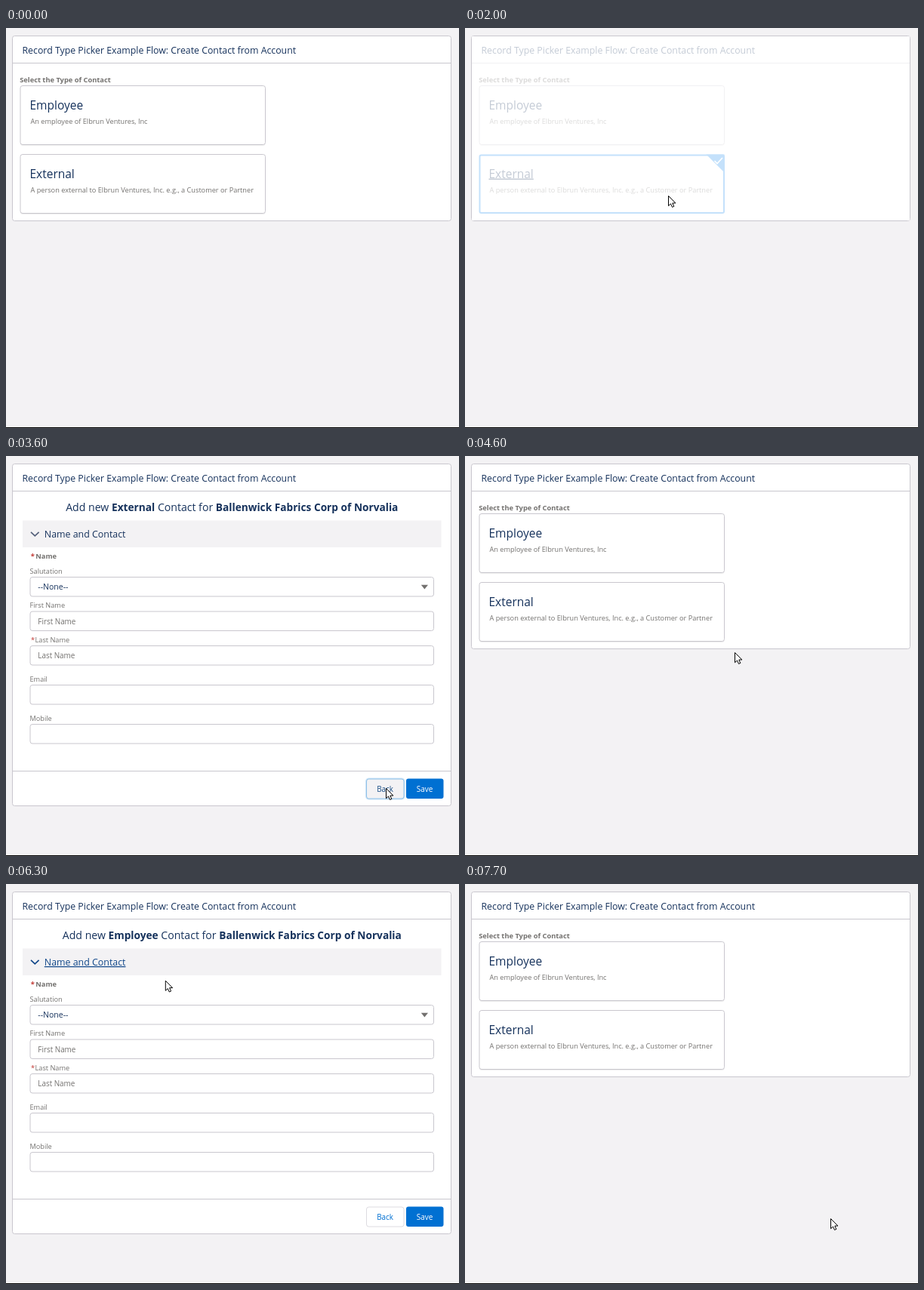
These frames come from a looping animation (600x530 px, 8000 ms). An HTML page:

```html
<!DOCTYPE html>
<html lang="en">
<head>
<meta charset="utf-8">
<title>Record Type Picker</title>
<style>
html, body { margin: 0; width: 100%; height: 100%; overflow: hidden; background: #f3f2f4; }
svg { display: block; font-family: "Open Sans", "Noto Sans", sans-serif; }
</style>
</head>
<body>
<svg id="stage" width="600" height="530" viewBox="0 0 600 530"></svg>
<script>
const LOOP = 8000, STEP = 100;
const NAVY = '#16325c', GRAY = '#73716f', LINE = '#c9c7ce', BLUE = '#1589ee';

const text = (x, y, size, fill, content, extra = '') =>
  `<text x="${x}" y="${y}" font-size="${size}" fill="${fill}" ${extra}>${content}</text>`;
const rect = (x, y, w, h, fill, stroke = 'none', extra = '') =>
  `<rect x="${x}" y="${y}" width="${w}" height="${h}" fill="${fill}" stroke="${stroke}" ${extra}/>`;
const path = (d, fill, stroke = 'none', width = 1) =>
  `<path d="${d}" fill="${fill}" stroke="${stroke}" stroke-width="${width}"/>`;
const BOLD = 'font-weight="700"', UNDERLINE = 'text-decoration="underline"';
const inside = (p, x, y, w, h) => p.x >= x && p.x < x + w && p.y >= y && p.y < y + h;

// Pointer keys: time, position, easing used to arrive there
const linear = p => p, easeIn = p => p * p, easeOut = p => p * (2 - p),
      smooth = p => p * p * (3 - 2 * p);
const POINTER = [
  [300, 496, 440, linear], [1200, 411, 341, easeIn], [1400, 269, 222, easeOut],
  [2500, 269, 222, linear], [3100, 503, 440, smooth],
  [4200, 503, 440, linear], [4600, 357, 260, easeIn], [5100, 195, 109.5, easeOut],
  [6200, 195, 109.5, linear], [6900, 480, 436.5, smooth], [7100, 484, 443, linear],
  [LOOP, 484, 443, linear]
];

function pointerAt(t) {
  const i = Math.max(1, POINTER.findIndex(key => key[0] >= t));
  const [t0, x0, y0] = POINTER[i - 1], [t1, x1, y1, ease] = POINTER[i];
  const p = ease(Math.max(0, (t - t0) / (t1 - t0)));
  return { x: x0 + (x1 - x0) * p, y: y0 + (y1 - y0) * p };
}

// View changes: start time, view, selected option, faded, click focus on Back
const STATES = [
  [0, 'picker'], [1900, 'picker', 'External'], [2000, 'picker', 'External', true],
  [2200, 'form', 'External'], [3300, 'form', 'External', false, true],
  [3700, 'form', 'External', true, true], [3900, 'picker'],
  [5400, 'picker', 'Employee'], [5500, 'picker', 'Employee', true],
  [5600, 'form', 'Employee'], [7300, 'form', 'Employee', false, true],
  [7500, 'form', 'Employee', true, true], [7700, 'picker']
];

const OPTIONS = [
  ['Employee', 76.5, 'An employee of Elbrun Ventures, Inc'],
  ['External', 167.5, 'A person external to Elbrun Ventures, Inc. e.g., a Customer or Partner']
];
const FIELDS = [
  ['Salutation', 160.5, '--None--', NAVY], ['First Name', 206, 'First Name', GRAY],
  ['Last Name', 251.5, 'Last Name', GRAY], ['Email', 303.5, ''], ['Mobile', 355.5, '']
];

const overOption = (p, y) => inside(p, 19, y, 325, 78);
const overBack = p => inside(p, 477, 428, 50, 26);

function card(height) {
  return rect(8.5, 10.5, 581, height, '#fff', LINE, 'rx="3"') +
    path('M9 46.5H589', 'none', LINE) +
    text(21.5, 33.5, 12.33, NAVY, 'Record Type Picker Example Flow: Create Contact from Account');
}

function option([name, y, description], selected, hovered) {
  const frame = selected
    ? rect(19.5, y + 1, 323.5, 76.5, '#fff', BLUE, 'rx="2" stroke-width="2"') +
      path(`M319.5 ${y}H343.5V${y + 24}Z`, BLUE) +
      path(`M330.5 ${y + 8.5}l3.5 3.5 7-7.5`, 'none', '#fff', 1.6)
    : rect(19, y + 1.5, 324.5, 78, '#000', 'none', 'rx="3" opacity=".07"') +
      rect(19, y, 324.5, 78, '#fff', hovered ? BLUE : LINE, 'rx="3"');
  return frame +
    text(31.5, y + 31, 15.5, NAVY, name, hovered || selected ? UNDERLINE : '') +
    text(32.5, y + 50.5, 9.2, GRAY, description);
}

function picker(pointer, selected) {
  return card(245) +
    text(18.2, 71.5, 9.3, GRAY, 'Select the Type of Contact', BOLD) +
    OPTIONS.map(o => option(o, o[0] === selected, pointer && overOption(pointer, o[1]))).join('');
}

function field([label, y, value, color], i) {
  const required = label === 'Last Name';
  return (required ? text(33, y - 5, 9.2, '#c23934', '*') : '') +
    text(required ? 38.5 : 31.5, y - 5, 9.2, GRAY, label) +
    rect(32, y, 534.5, 25.5, '#fff', LINE, 'rx="3"') +
    text(42.3, y + 16.7, i ? 9.9 : 10.5, color, value);
}

function form(pointer, type, backFocused) {
  const sectionColor = backFocused ? NAVY : '#12488a';
  const hovered = overBack(pointer);
  const bold = s => `<tspan ${BOLD} font-size="13.7">${s}</tspan>`;
  const backFill = hovered ? '#f3f2f4' : '#fff';
  const backLine = backFocused ? '#8fc1e8' : hovered ? '#f0eff2' : '#dddbe0';
  return card(453) +
    text(299.3, 73, 14.1, NAVY,
      `Add new ${bold(type)} Contact for ${bold('Ballenwick Fabrics Corp of Norvalia')}`,
      'text-anchor="middle"') +
    rect(22, 85.5, 554.5, 35.5, '#f3f2f4') +
    path('M33 100.8l5.3 5 5.3-5', 'none', backFocused ? '#54607a' : sectionColor, 1.7) +
    text(50.8, 108, 12.4, sectionColor, 'Name and Contact', backFocused ? '' : UNDERLINE) +
    text(32.8, 136, 9.4, '#c23934', '*', BOLD) +
    text(39.3, 136, 9.3, GRAY, 'Name', BOLD) +
    FIELDS.map(field).join('') +
    path('M549.8 170.8H559L554.4 176.5Z', GRAY) +
    path('M9 417.5H589', 'none', LINE) +
    (backFocused ? rect(477.5, 428, 49.5, 26, 'none', '#cfe5f7', 'rx="3" stroke-width="3"') : '') +
    rect(477.5, 428, 49.5, 26, backFill, backLine, 'rx="3"') +
    text(491.2, 444.5, 9.9, hovered ? '#1b4f86' : '#0070d2', 'Back') +
    rect(530, 427.5, 49.5, 26.5, '#0070d2', 'none', 'rx="3"') +
    text(543.8, 444.5, 10, '#fff', 'Save');
}

const CURSORS = {
  arrow: path('M.5 .5V13.7L3.5 10.9 5.5 15.4 7.8 14.4 5.8 10H9.9Z', '#fff', '#000'),
  hand: path('M-1.6 11.5V1.6A1.6 1.6 0 0 1 1.6 1.6V7A1.5 1.5 0 0 1 4.4 7.4A1.5 1.5 0 0 1 6.7 8.2' +
    'A1.3 1.3 0 0 1 8.6 9.4V13Q8.6 15 7 17V19H-.6V17.5Q-2.5 15.5-4.8 12.2' +
    'Q-5.8 10.3-4.3 9.8Q-3 9.6-1.6 11.5Z', '#fff', '#000'),
  beam: path('M-1 -6.5H1.5M2.5 -6.5H5M-1 7.5H1.5M2.5 7.5H5M2 -6V7', 'none', '#000')
};

function cursorKind(t, p, view, selected, faded) {
  if (view === 'picker') {
    const over = OPTIONS.some(o => overOption(p, o[1]));
    return over && !(faded && selected === 'External') ? 'hand' : 'arrow';
  }
  if (faded || (t >= 3600 && t < 3900)) return 'arrow';
  if (overBack(p) || inside(p, 22, 85, 554, 36)) return 'hand';
  return FIELDS.slice(1).some(f => inside(p, 32, f[1], 534, 25)) ? 'beam' : 'arrow';
}

function scene(t) {
  const [, view, selected, faded, backFocused] = STATES.filter(s => s[0] <= t).pop();
  const pointer = t >= 400 ? pointerAt(t) : null;
  const isForm = view === 'form';
  let out = isForm ? form(pointer, selected, backFocused) : picker(pointer, selected);
  if (faded) out += rect(9, 11, 580, isForm ? 452 : 244, '#fff', 'none', 'opacity=".75"');
  if (pointer) {
    const kind = cursorKind(t, pointer, view, selected, faded);
    out += `<g transform="translate(${pointer.x} ${pointer.y})">${CURSORS[kind]}</g>`;
  }
  return out + rect(0, 529, 600, 1, '#000');
}

const stage = document.getElementById('stage');
const start = performance.now();
let shown = -1;
function tick() {
  const t = Math.floor((performance.now() - start) % LOOP / STEP) * STEP;
  if (t !== shown) stage.innerHTML = scene(shown = t);
  requestAnimationFrame(tick);
}
tick();
</script>
</body>
</html>
```
